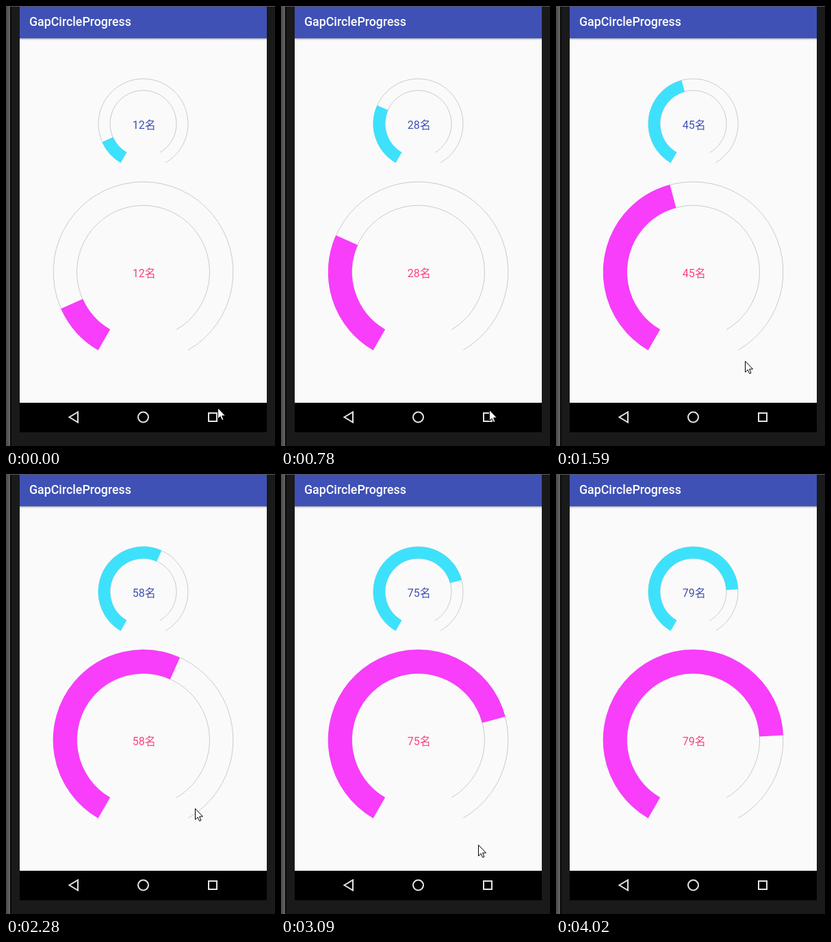
Recreate the animation shown at these times as an HTML page. Size 393x641 px, loop 4270 ms.

```html
<!DOCTYPE html>
<html lang="en">
<head>
<meta charset="utf-8">
<title>GapCircleProgress</title>
<style>
  html, body { margin: 0; height: 100%; overflow: hidden; background: #1a1a1a; }
  svg { display: block; }
  text { font-family: Roboto, "Noto Sans CJK SC", "Noto Sans CJK JP", "Noto Sans CJK", sans-serif; }
  .title { font-size: 17.8px; font-weight: 500; fill: #fff; }
  .label { font-size: 16px; }
  .outline { fill: none; stroke: #c4c4c4; stroke-width: .9; }
  .fill { fill: none; }
  .nav { fill: none; stroke: #e4e4e4; stroke-width: 2; }
</style>
</head>
<body>
<svg width="393" height="641" viewBox="0 0 393 641">
  <defs>
    <linearGradient id="edge">
      <stop offset="0" stop-color="#484848"/>
      <stop offset="1" stop-color="#666"/>
    </linearGradient>
    <linearGradient id="shadow" x2="0" y2="1">
      <stop offset="0" stop-color="#a9abb8"/>
      <stop offset="1" stop-color="#fafafa"/>
    </linearGradient>
  </defs>

  <rect width="393" height="641" fill="#1a1a1a"/>
  <rect width="6" height="641" fill="url(#edge)"/>
  <rect x="6" width="2" height="641" fill="#080808"/>
  <rect x="20" width="361" height="578" fill="#fafafa"/>
  <rect x="20" width="361" height="47" fill="#3f51b5"/>
  <rect x="20" y="47" width="361" height="3" fill="url(#shadow)"/>
  <rect width="393" height="1" fill="#5a5a62"/>
  <text class="title" x="34" y="29">GapCircleProgress</text>

  <rect x="20" y="578" width="361" height="43" fill="#000"/>
  <g class="nav">
    <path d="M105 591.5V606.5L92.5 599Z"/>
    <circle cx="200.5" cy="599" r="7.5"/>
    <rect x="296" y="593" width="12" height="12"/>
  </g>

  <g id="gauges"></g>
  <path id="cursor" d="M.5 .5V16.5L4.1 13L6.6 18.6L9 17.6L6.6 12H11.5Z" fill="#fff" stroke="#000"/>
</svg>
<script>
const LOOP = 4270, STEP = 134, LEAD = 25;
const CENTER_X = 200.5;

// Pointer stops: step, x, y
const POINTER = [[0, 309, 585], [6, 304, 588], [12, 276, 517], [17, 276, 487],
  [21, 281, 494], [23, 288, 540], [30, 289, 660]];

// Arc with a 60 degree gap at the bottom
function arc(cy, r, attrs) {
  const dx = r / 2, y = cy + r * Math.sqrt(3) / 2;
  return `<path d="M${CENTER_X - dx} ${y}A${r} ${r} 0 1 1 ${CENTER_X + dx} ${y}" ${attrs}/>`;
}

function gauge(cy, r, width, fill, textColor) {
  const half = width / 2 - .3;
  return arc(cy, r - half, 'class="outline"') + arc(cy, r + half, 'class="outline"') +
    arc(cy, r, `class="fill" pathLength="100" stroke="${fill}" stroke-width="${width}"`) +
    `<text class="label" x="${CENTER_X - 15.7}" y="${cy + 7.5}" fill="${textColor}"></text>`;
}

document.getElementById('gauges').innerHTML =
  gauge(171.5, 57, 17.6, '#3de1fc', '#3f51b5') +
  gauge(387.5, 114.2, 35, '#f83dfb', '#ff4081');

const fills = document.querySelectorAll('.fill');
const labels = document.querySelectorAll('.label');
const cursor = document.getElementById('cursor');

const smooth = k => k * k * (3 - 2 * k);

function pointerAt(step) {
  const next = Math.max(1, POINTER.findIndex(stop => stop[0] >= step));
  const [s0, x0, y0] = POINTER[next - 1], [s1, x1, y1] = POINTER[next];
  const k = smooth((step - s0) / (s1 - s0));
  return [Math.round(x0 + (x1 - x0) * k), Math.round(y0 + (y1 - y0) * k)];
}

function draw(now) {
  const step = Math.min(30, Math.floor((now % LOOP + LEAD) / STEP));
  const value = Math.min(79, Math.round(12 + step * 30 / 11));
  fills.forEach(fill => fill.setAttribute('stroke-dasharray', `${value} 200`));
  labels.forEach(label => label.textContent = value + '名');
  cursor.setAttribute('transform', `translate(${pointerAt(step)})`);
}

let start;
function tick(now) {
  start ??= now;
  draw(now - start);
  requestAnimationFrame(tick);
}
draw(0);
requestAnimationFrame(tick);
</script>
</body>
</html>
```
